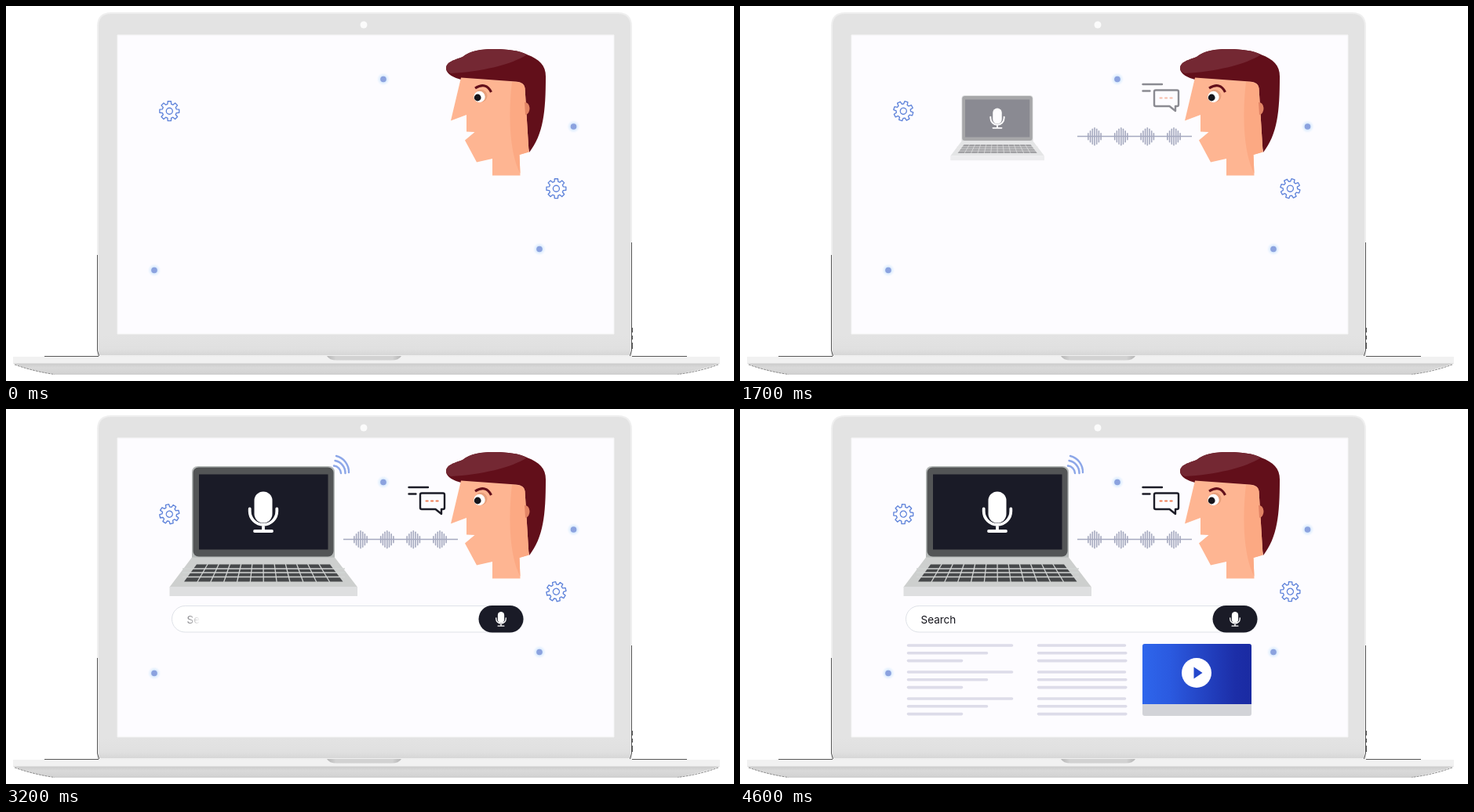
These frames come from a looping animation (928 by 479 pixels, 9600 ms). An HTML page:

```html
<!DOCTYPE html>
<html lang="en">
<head>
<meta charset="utf-8">
<title>Voice search</title>
<style>
  html, body { margin: 0; width: 100%; height: 100%; overflow: hidden; background: #fff; }
  svg { display: block; width: 928px; height: 479px; }
  text { font: 13.5px Inter, "Open Sans", sans-serif; fill: #15151c; }
</style>
</head>
<body>
<svg viewBox="0 0 928 479" fill="none">
  <defs>
    <linearGradient id="lid" x2="0" y2="1">
      <stop offset=".94" stop-color="#e3e3e3"/><stop offset=".98" stop-color="#e0e0e0"/><stop offset="1" stop-color="#d5d5d5"/>
    </linearGradient>
    <linearGradient id="foot" x2="0" y2="1">
      <stop stop-color="#cbcbcb"/><stop offset=".4" stop-color="#d9d9d9"/><stop offset="1" stop-color="#d2d2d2"/>
    </linearGradient>
    <linearGradient id="notch">
      <stop stop-color="#b5b5b5"/><stop offset=".12" stop-color="#d2d2d2"/>
      <stop offset=".88" stop-color="#d2d2d2"/><stop offset="1" stop-color="#b5b5b5"/>
    </linearGradient>
    <linearGradient id="video">
      <stop stop-color="#2e66ec"/><stop offset=".25" stop-color="#2b5ae0"/><stop offset=".85" stop-color="#1c2ea8"/><stop offset="1" stop-color="#1a2aa2"/>
    </linearGradient>
    <radialGradient id="glow">
      <stop offset=".35" stop-color="#a9d0f8" stop-opacity=".6"/><stop offset="1" stop-color="#d5ecff" stop-opacity="0"/>
    </radialGradient>
    <g id="mic">
      <rect x="-11.5" y="-26" width="23" height="40" rx="11.5" fill="#fff"/>
      <path d="M-17.3-4v3a17.3 17.3 0 0 0 34.6 0v-3M0 17v7M-11 24.5h22" stroke="#fff" stroke-width="3.8" stroke-linecap="round"/>
    </g>
    <g id="dot"><circle r="8.5" fill="url(#glow)"/><circle r="3.8" fill="#8ba2df"/></g>
  </defs>

  <!-- computer frame -->
  <path d="M117 447V26Q117 9 134 9H780Q797 9 797 26V447Z" fill="url(#lid)" stroke="#efefef" stroke-width="2"/>
  <path d="M116.500 318V440l2 7M797.500 302V440l-2 7M49 447.500h69M798 447.500h70M798.500 411v6m0 4v5m0 4v8" stroke="#444" stroke-width=".9"/>
  <path d="M142 37H775V419H142Z" fill="#fdfcff" stroke="#f4f4f4"/>
  <circle cx="456" cy="24" r="4.500" fill="#fbfbfb"/>
  <path d="M9 448H910V457H9Z" fill="#f1f1f1"/>
  <path d="M9 456.500H910Q886 465 858 470H62Q34 467 9 456.500Z" fill="url(#foot)"/>
  <path d="M11 458Q36 467 62 470.500M908 458Q884 467 856 470.500" stroke="#666" stroke-width=".8" stroke-dasharray="3 1"/>
  <path d="M62 470.300H858" stroke="#bcbcbc" stroke-width=".8"/>
  <path d="M409 447H504Q501 452.500 491 452.500H422Q412 452.500 409 447Z" fill="url(#notch)"/>

  <use href="#dot" x="481" y="93.500"/><use href="#dot" x="723.500" y="154"/>
  <use href="#dot" x="680" y="310.500"/><use href="#dot" x="189" y="337.500"/>
  <g id="gears" stroke="#5f83da" stroke-width="1.350" stroke-linejoin="round"></g>

  <!-- head -->
  <path d="M561 80C561 71 572 69 582 65C592 57 606 55 622 55C640 55 654 57 664 62C680 68 688 76 688 90C688 135 685 164 667 187L650 98L580 94C572 92 561 87 561 80Z" fill="#620f1a"/>
  <path d="M561 80C561 71 572 69 582 65C592 57 606 55 622 55C640 55 654 57 664 62C645 75 605 84 567 86Q561 83 561 80Z" fill="#742833"/>
  <path d="M580 91.500L567 146.500L587 139V160.500L597.500 161L585 171.500L600 199.500L620 195V216.500H655.500L654.500 190L666.500 186.500L661.500 105Q661 97 650 96.500Z" fill="#feb592"/>
  <path d="M645 97C641 130 640 184 655.500 214L654.500 190L666.500 186.500L661.500 105Q661 97 645 97Z" fill="#fca983"/>
  <path d="M661 123a6 8 0 0 1 1 16Z" fill="#e28465"/>
  <circle cx="605.500" cy="114.800" r="8" fill="#e8a07c"/>
  <circle cx="603.500" cy="116" r="7.200" fill="#fff"/>
  <circle cx="601.200" cy="117" r="4.400" fill="#16161c"/>
  <path d="M598 105Q612 96.500 618.500 110" stroke="#620f1a" stroke-width="3.200"/>

  <g id="wave" stroke="#a5a9bf"></g>

  <g id="bubble" stroke="#1c1c27" stroke-width="2.400" stroke-linecap="round" stroke-linejoin="round">
    <path d="M513.500 100H538M513.500 108.500H522.500M530 107.500H557Q559 107.500 559 109.500V126Q559 128 557 128H555V134L547.500 128H530Q528 128 528 126V109.500Q528 107.500 530 107.500Z"/>
    <path d="M535.500 117.500h2.200m4.300 0h2.200m4.300 0h2.200" stroke="#f08058" stroke-width="2"/>
  </g>

  <g id="laptop">
    <path d="M237 190V81Q237 73 245 73H411Q419 73 419 81V190Z" fill="#b5b9b8"/>
    <rect x="238.500" y="74.500" width="179" height="114" rx="7" fill="#535556"/>
    <path d="M246 83.500H410.500V179.500H246Z" fill="#1a1b27"/>
    <use href="#mic" x="328" y="131.500"/>
    <path d="M237 189.500H419L448 227.500H208.500Z" fill="#cdcfce"/>
    <path d="M208.500 227H448V239H208.500Z" fill="#dedfe0"/>
    <path d="M243 198.500H413L429.500 220.500H227Z" fill="#47494b"/>
    <g id="keys" stroke="#d2d4d3" stroke-width="1.300"></g>
  </g>

  <path id="signal" d="M418 72.500A10 10 0 0 1 427 82M419.500 66A16 16 0 0 1 432.500 82M421 60A21 21 0 0 1 437 81" stroke="#8da7e8" stroke-width="2.400" stroke-linecap="round"/>

  <g id="bar">
    <rect x="211.500" y="251.500" width="448" height="33.500" rx="16.750" fill="#fff" stroke="#dfe2e8"/>
    <rect x="602.500" y="251" width="57" height="34.500" rx="17.250" fill="#1a1b27"/>
    <use href="#mic" transform="translate(631 268.300) scale(.36)"/>
  </g>
  <g id="query"><text x="230.500" y="273.500">Search</text></g>

  <g stroke="#dddce9" stroke-width="3.600" stroke-linecap="round">
    <g id="leftLines"></g>
    <g id="midLines"></g>
  </g>

  <g id="player">
    <rect x="513" y="300" width="139" height="92" rx="3" fill="#d2d3d8"/>
    <path d="M513 377V303Q513 300 516 300H649Q652 300 652 303V377Z" fill="url(#video)"/>
    <circle cx="582" cy="337" r="19" fill="#fff"/>
    <path d="M578.500 329.500L589.500 337L578.500 344.500Z" fill="#2448cc"/>
  </g>
</svg>
<script>
const LOOP = 9600, STEP = 100, LAST = 4600, DURATION = 510;
const NS = 'http://www.w3.org/2000/svg';
const $ = id => document.getElementById(id);

function add(parent, tag, attrs) {
  const node = document.createElementNS(NS, tag);
  for (const key in attrs) node.setAttribute(key, attrs[key]);
  return parent.appendChild(node);
}
const path = (parent, d, attrs) => add(parent, 'path', { d, ...attrs });

// Gears: eight tapered teeth around a small hub.
function gearPath() {
  const points = [];
  for (let i = 0; i < 8; i++) {
    for (const [offset, r] of [[-15, 9.2], [-9.5, 12.6], [9.5, 12.6], [15, 9.2]]) {
      const a = (i * 45 + offset) * Math.PI / 180;
      points.push(`${(r * Math.cos(a)).toFixed(2)} ${(r * Math.sin(a)).toFixed(2)}`);
    }
  }
  return `M${points.join('L')}Z`;
}
const gears = [[208.3, 134.2], [701.4, 233.2]].map(([x, y]) => {
  const node = add($('gears'), 'g', {});
  path(node, gearPath());
  add(node, 'circle', { r: 4 });
  return { node, x, y };
});

// Sound wave
path($('wave'), 'M430 166.500H576', { 'stroke-width': 1.5 });
for (const x of [452, 485.8, 519.3, 553]) {
  [8, 14, 19, 22, 19, 14, 8].forEach((h, i) =>
    path($('wave'), `M${x + (i - 3) * 2.7} ${166.7 - h / 2}v${h}`, { 'stroke-width': 1.6, 'stroke-linecap': 'round' }));
}

// Key gaps
for (const y of [204, 209, 214.5]) path($('keys'), `M225 ${y}H432`);
for (let i = 1; i < 12; i++) {
  path($('keys'), `M${243 + i * 170 / 12} 198L${227 + i * 202.5 / 12} 221`);
}

// Result text lines
for (let i = 0; i < 9; i++) {
  const y = 302 + Math.floor(i / 3) * 34 + (i % 3) * 9.8;
  path($('leftLines'), `M214.500 ${y}H${346.5 - (i % 3) * 32}`);
  path($('midLines'), `M380.500 ${y}H${i % 3 ? 491.8 : 490.5}`);
}

const progress = (t, start) => Math.min(1, Math.max(0, (t - start) / DURATION));

// Reveals a group with a soft edge travelling from one x to another.
function wipe(id, from, to, start) {
  const soft = 30 * Math.sign(to - from);
  const defs = document.querySelector('defs');
  const gradient = add(defs, 'linearGradient', { id: id + 'Fade', gradientUnits: 'userSpaceOnUse', y1: 0, y2: 0 });
  add(gradient, 'stop', { offset: 0, 'stop-color': '#fff' });
  add(gradient, 'stop', { offset: 1, 'stop-color': '#000' });
  const mask = add(defs, 'mask', { id: id + 'Mask', maskUnits: 'userSpaceOnUse', x: 0, y: 0, width: 928, height: 479 });
  add(mask, 'rect', { width: 928, height: 479, fill: `url(#${id}Fade)` });
  $(id).setAttribute('mask', `url(#${id}Mask)`);
  return t => {
    const edge = from + (to + soft - from) * progress(t, start);
    gradient.setAttribute('x1', edge - soft);
    gradient.setAttribute('x2', edge);
  };
}

const fade = (id, start) => t => $(id).setAttribute('opacity', progress(t, start));

function zoom(id, x, y, start) {
  return t => {
    const p = progress(t, start);
    $(id).setAttribute('opacity', p);
    $(id).setAttribute('transform', `translate(${x} ${y}) scale(${p}) translate(${-x} ${-y})`);
  };
}

const parts = [
  wipe('wave', 577, 429, 740),
  fade('bubble', 1445),
  zoom('laptop', 328, 155.7, 1445),
  fade('signal', 2000),
  fade('bar', 2560),
  wipe('query', 229, 277, 3080),
  wipe('leftLines', 212, 349, 3600),
  zoom('player', 582.5, 346, 3600),
  wipe('midLines', 378, 495, 4090)
];

function draw(now) {
  const t = Math.min(LAST, Math.floor(now % LOOP / STEP) * STEP);
  for (const g of gears) g.node.setAttribute('transform', `translate(${g.x} ${g.y}) rotate(${t * 0.01})`);
  for (const update of parts) update(t);
}

const began = performance.now();
function tick() {
  draw(performance.now() - began);
  requestAnimationFrame(tick);
}
tick();
</script>
</body>
</html>
```
